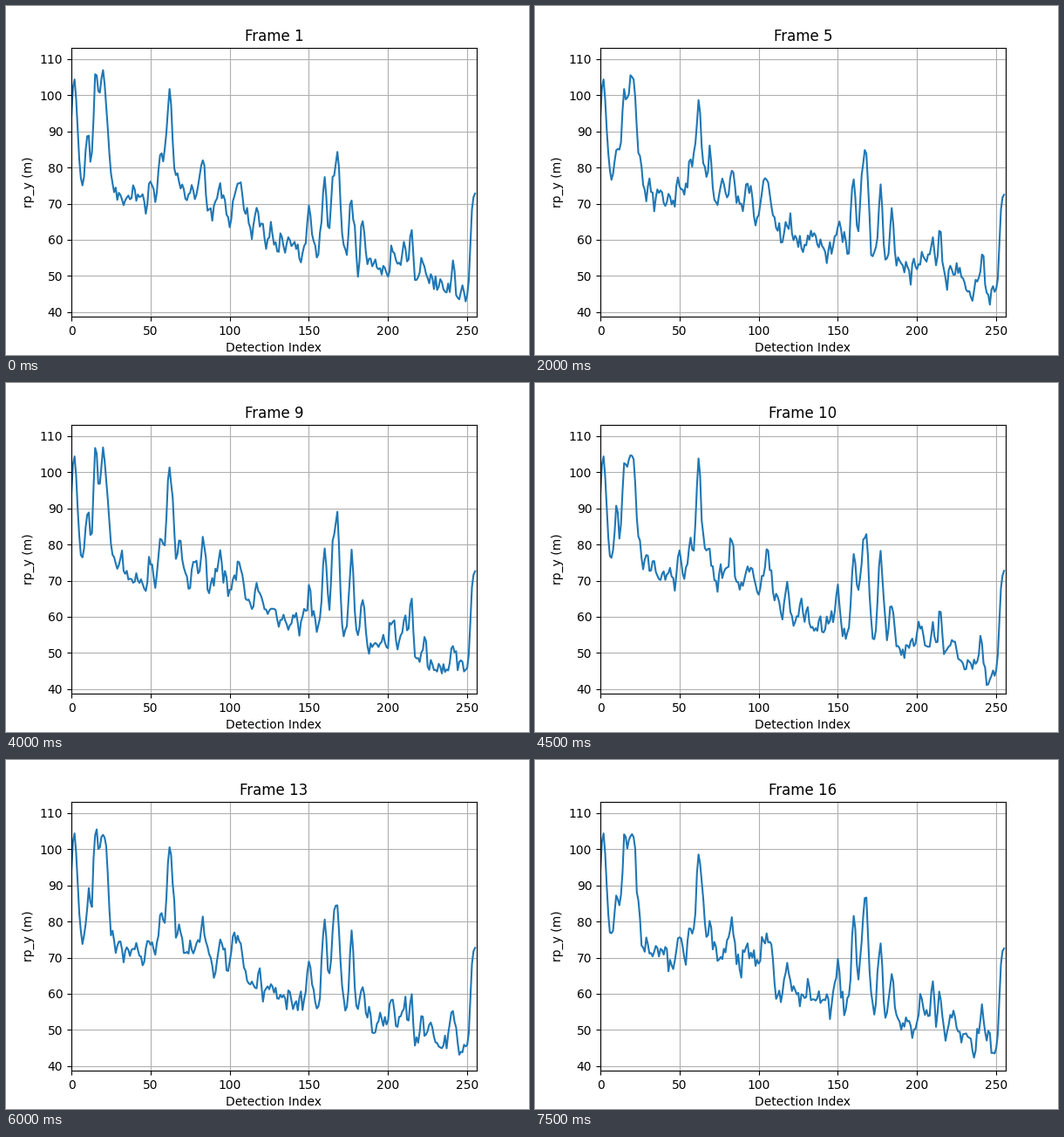
Recreate the animation shown at these times as a matplotlib script. Size 600 by 400 pixels, loop 8 s.

```python
import numpy as np
import matplotlib.pyplot as plt
from matplotlib.animation import FuncAnimation

FRAMES = 16
LOW, HIGH = 38.75, 113.1
X = np.arange(256)

# Persistent echoes above the falling trend: (index, height, width)
ECHOES = [
    (1.8, 28, 2.6), (10.5, 13, 2), (15, 22, 1.8), (20, 31, 4),
    (50, 6, 1.8), (56.5, 11, 1.8), (62.2, 32, 2.9), (69, 11, 3),
    (77, 8, 2.5), (83, 14, 3), (94, 9.5, 4), (105.3, 13, 4.3),
    (118, 5, 2.5), (150, 10, 2), (160, 22, 2.2), (165, 16, 1.8),
    (168, 28, 2.3), (177, 22, 2), (184, 11, 2), (203, 7, 3),
    (210, 10, 2), (214.5, 12, 1.6), (223, 5, 3), (241, 9, 2),
]


def profile():
    y = 76.8 - 0.13 * X
    for center, height, width in ECHOES:
        y += height * np.exp(-((X - center) / width) ** 2)
    return y + 29 / (1 + np.exp(-1.6 * (X - 252)))


def jitter(rng):
    """Short-range correlated noise that fades out at both ends."""
    white = rng.normal(size=(FRAMES, X.size))
    noise = 0.9 * white + 0.45 * np.roll(white, 1, axis=1)
    fade = np.clip((X - 3) / 6, 0, 1) * np.clip((252 - X) / 6, 0.1, 1)
    return 2 * fade * noise


rows = np.clip(profile() + jitter(np.random.default_rng(12)), LOW, HIGH)

fig, ax = plt.subplots(figsize=(6, 4), dpi=100)
line, = ax.plot(X, rows[0])
ax.set_xlim(0, 256)
ax.set_ylim(LOW, HIGH)
ax.set_xlabel("Detection Index")
ax.set_ylabel("rp_y (m)")
ax.grid(True)
title = ax.set_title("Frame 1")


def update(i):
    line.set_ydata(rows[i])
    title.set_text(f"Frame {i + 1}")
    return line, title


anim = FuncAnimation(fig, update, frames=FRAMES, interval=500,
                     repeat=True, repeat_delay=0, blit=False)
plt.show()
```
